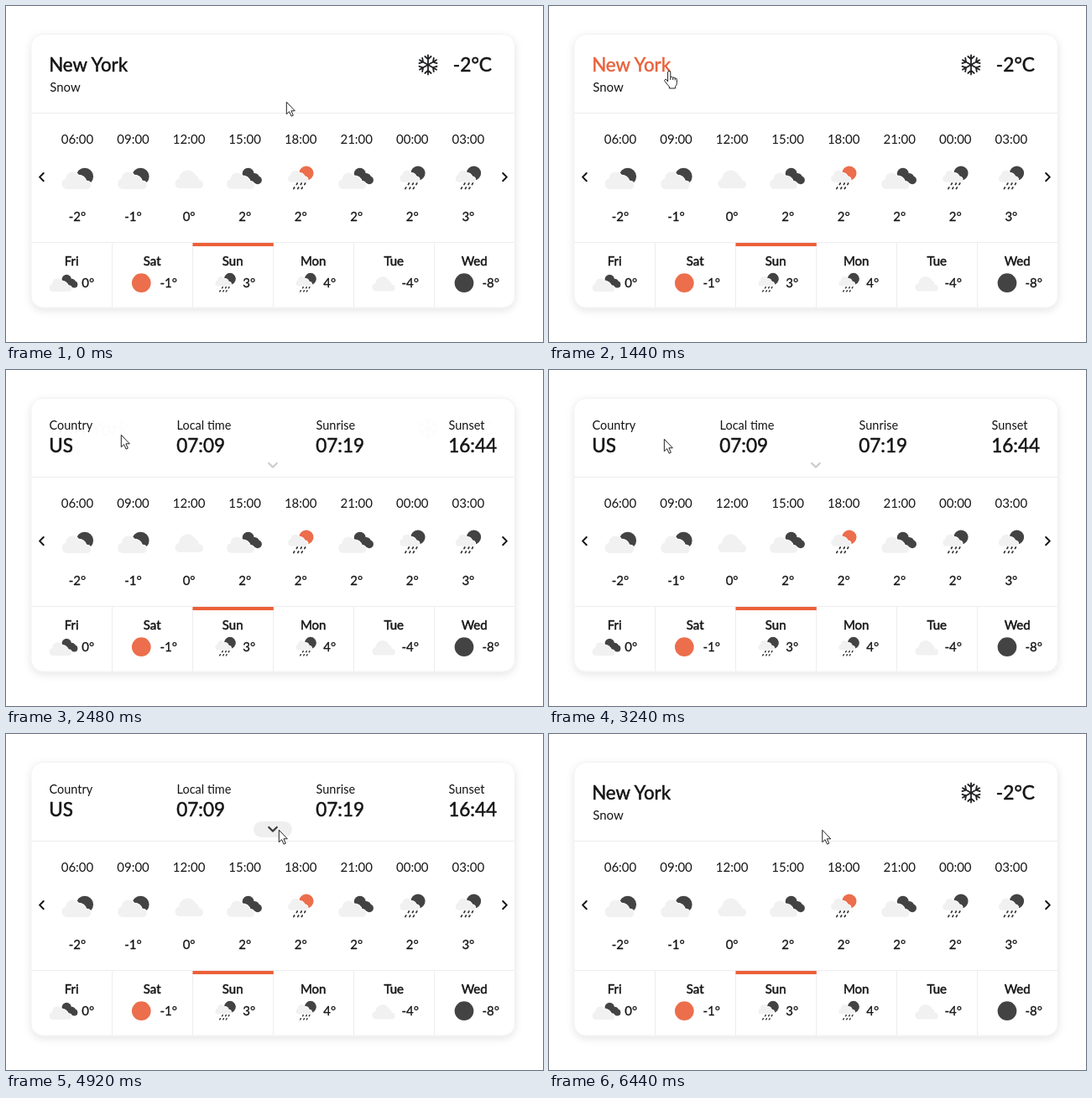
An HTML page that plays this animation: 640 px wide and 400 px high, repeating every 6480 ms.

```html
<!DOCTYPE html>
<html lang="en">
<head>
<meta charset="utf-8">
<title>Weather widget</title>
<style>
  html, body { margin: 0; width: 100%; height: 100%; overflow: hidden; background: #fff; }
  svg { display: block; width: 640px; height: 400px; }
  text { font: 15px Lato, "Open Sans", sans-serif; fill: currentColor; color: #151515; }
  .mid { text-anchor: middle; }
  .medium { stroke: currentColor; stroke-width: .3; stroke-linejoin: round; }
  .bold { stroke: currentColor; stroke-width: .5; stroke-linejoin: round; }
  .label { font-size: 14.5px; }
  .value { font-size: 22.5px; }
  .title { font-size: 22.3px; color: inherit; }
  .temp { font-size: 22.7px; }
  .stroke { fill: none; stroke-linecap: round; stroke-linejoin: round; }
</style>
</head>
<body>
<svg id="stage" viewBox="0 0 640 400"></svg>
<script>
const LOOP = 6480;
const DARK = '#434343', ORANGE = '#ec6e4c', LIGHT = '#f1f1f1', LINE = '#ededf0';
const SHIFT = 25.5;

const text = (x, y, content, cls = '') => `<text x="${x}" y="${y}" class="${cls}">${content}</text>`;
const circle = (x, y, r, fill) => `<circle cx="${x}" cy="${y}" r="${r}" fill="${fill}"/>`;
const line = (x1, y1, x2, y2) => `<path d="M${x1} ${y1}L${x2} ${y2}" stroke="${LINE}"/>`;
const place = (x, y, scale, content) =>
  `<g transform="translate(${x} ${y}) scale(${scale})">${content}</g>`;

const CLOUD = 'M-12 11A6 6 0 0 1-13-.9A11 11 0 0 1 8-5A7 7 0 0 1 12 1A5 5 0 0 1 12.5 11Z';
const FRONT = 'M-13 13A6.2 6.2 0 0 1-13.5.8A7.6 7.6 0 0 1 1-3A9 9 0 0 1 10.5 4A4.6 4.6 0 0 1 12.5 13Z';
const frontCloud = (x, y, scale) => place(x, y, scale,
  `<path d="${FRONT}" fill="#fff" stroke="#fff" stroke-width="2.4"/><path d="${FRONT}" fill="${LIGHT}"/>`);

const drops = [[-4, 6], [1, 6], [5.5, 6], [-7.5, 11], [-2.5, 11], [2, 11]]
  .map(([x, y]) => `M${x} ${y}l-.9 1.6`).join('');
const rain = sun => circle(6.7, -6, 8.6, sun) + frontCloud(-2.5, -4.2, .68) +
  `<path class="stroke" d="${drops}" stroke="#333" stroke-width="1.7"/>`;

const icons = {
  moonCloud: circle(8.8, -2, 10.3, DARK) + frontCloud(0, 0, 1),
  cloud: place(.5, 1.5, .96, `<path d="${CLOUD}" fill="${LIGHT}"/>`),
  clouds: circle(4, -5.3, 7, DARK) + circle(11.5, 0, 6, DARK) + circle(15.3, 2.3, 4.9, DARK) +
    frontCloud(-4, .5, .95),
  rain: rain(DARK),
  sunRain: rain(ORANGE),
  sun: circle(0, 0, 14, ORANGE),
  moon: circle(0, 0, 14, DARK)
};

const hours = [
  ['06:00', 'moonCloud', '-2°'], ['09:00', 'moonCloud', '-1°'], ['12:00', 'cloud', '0°'],
  ['15:00', 'clouds', '2°'], ['18:00', 'sunRain', '2°'], ['21:00', 'clouds', '2°'],
  ['00:00', 'rain', '2°'], ['03:00', 'rain', '3°']
].map(([hour, icon, degrees], i) => {
  const x = 85 + i * 66.55;
  return text(x, 163.5, hour, 'mid') + place(x, 205, 1, icons[icon]) +
    text(x, 256, degrees, 'mid medium');
}).join('');

const days = [
  ['Fri', 'clouds', '0°', 38.5], ['Sat', 'sun', '-1°', 34.8], ['Sun', 'rain', '3°', 39],
  ['Mon', 'rain', '4°', 39], ['Tue', 'cloud', '-4°', 35.5], ['Wed', 'moon', '-8°', 35.5]
].map(([day, icon, degrees, iconX], i) => {
  const left = 30.5 + i * 96;
  return (i ? line(left, 282, left, 359) : '') +
    text(left + 47.7, 308.5, day, 'mid bold') +
    place(left + iconX, 329.7, .81, icons[icon]) +
    text(left + 67.3, 334.5, degrees, 'mid medium');
}).join('');

const arm = '<path d="M0 0V-11.6M-3.7-10L0-6.8L3.7-10"/>';
const snowflake = '<g class="stroke" stroke="#202124" stroke-width="1.8" transform="translate(503 70)">' +
  [0, 60, 120, 180, 240, 300].map(a => `<g transform="rotate(${a})">${arm}</g>`).join('') + '</g>';

const details = [
  [52, 'Country', 'US'], [204, 'Local time', '07:09'],
  [370, 'Sunrise', '07:19'], [528, 'Sunset', '16:44']
].map(([x, label, value]) =>
  text(x - .5, 71, label, 'label') + text(x - .8, 98, value, 'value bold')).join('');

document.getElementById('stage').innerHTML = `
  <defs><filter id="shadow" x="-10%" y="-10%" width="120%" height="125%">
    <feDropShadow dx="0" dy="3" stdDeviation="5" flood-color="#000" flood-opacity=".1"/>
  </filter></defs>
  <rect x="30" y="33.5" width="576.5" height="325.5" rx="14" fill="#fff" stroke="#f1f1f1" filter="url(#shadow)"/>
  ${line(30, 127.5, 606, 127.5)}${line(30, 281.5, 606, 281.5)}
  ${hours}${days}
  <rect x="222.5" y="282" width="96.3" height="4" fill="#ec5f38"/>
  <path class="stroke" d="M44.7 199l-4.6 4.6 4.6 4.6M592.2 199l4.6 4.6-4.6 4.6" stroke="#151515" stroke-width="2"/>
  <g id="summary">
    <g id="city">${text(51.2, 78.3, 'New York', 'title bold')}</g>
    ${text(52.2, 102.3, 'Snow')}
    ${snowflake}
    ${text(532.8, 77.5, '-2°C', 'temp bold')}
  </g>
  <g id="details">${details}</g>
  <g id="toggle">
    <rect id="pill" x="295" y="104" width="46" height="19" rx="9.5" fill="#efefef"/>
    <path id="chevron" class="stroke" d="M313.2 111l4.8 4.6 4.8-4.6" stroke-width="2.2"/>
  </g>
  <g id="cursor" fill="#fff" stroke="#222" stroke-width="1" stroke-linejoin="round">
    <path id="arrow" d="M.3.3V14.8L3.6 11.7L6.1 17.2L8.3 16.2L5.9 10.8H10.3Z"/>
    <path id="hand" d="M4.6 13V2Q4.6.4 6.2.4T7.8 2V7.6Q9.6 6.5 10.7 8.2Q12.4 7.3 13.2 9Q15.4 8.5 15.4 10.8V14.5Q15.4 17 13.7 18.6V21H6.4V19Q3.8 16.5 1 12.4Q.2 10.9 1.6 10.3T4.6 13M7.8 7.6V11M10.7 8.2V11M13.2 9V11.4"/>
  </g>`;

const [summary, city, detailsBox, toggle, pill, chevron, cursor, arrow, hand] =
  ['summary', 'city', 'details', 'toggle', 'pill', 'chevron', 'cursor', 'arrow', 'hand']
    .map(id => document.getElementById(id));

const clamp = v => Math.min(1, Math.max(0, v));
const ramp = (t, start, length) => clamp((t - start) / length);
const mix = (a, b, p) => a + (b - a) * p;
const mixColor = (a, b, p) => `rgb(${a.map((v, i) => Math.round(mix(v, b[i], p)))})`;

// The CSS "ease" curve, solved by bisection.
function ease(x) {
  if (x <= 0 || x >= 1) return clamp(x);
  const bezier = (s, a, b) => 3 * s * (1 - s) * (1 - s) * a + 3 * s * s * (1 - s) * b + s ** 3;
  let low = 0, high = 1;
  for (let i = 0; i < 20; i++) {
    const s = (low + high) / 2;
    if (bezier(s, .25, .25) < x) low = s; else high = s;
  }
  return bezier(low, .1, 1);
}

const route = [
  [0, 334, 114], [40, 334, 114], [360, 262, 98], [680, 176, 81], [900, 147, 77], [1300, 137, 77],
  [3200, 137, 77], [3240, 137, 82], [3720, 161, 90], [4400, 262, 111], [4880, 325, 114], [LOOP, 325.5, 114]
];

function pointer(t) {
  const i = route.findIndex(stop => stop[0] > t);
  const [t0, x0, y0] = route[i - 1], [t1, x1, y1] = route[i];
  const p = (t - t0) / (t1 - t0);
  return [mix(x0, x1, p), mix(y0, y1, p)];
}

function draw(t) {
  const closing = t > 5000;
  const open = closing ? 1 - ease(ramp(t, 5372, 500)) : ease(ramp(t, 2060, 500));
  // The incoming layer gains opacity ahead of the outgoing one.
  const lead = p => 1 - (1 - p) ** 2;
  summary.setAttribute('opacity', closing ? lead(1 - open) : 1 - open);
  detailsBox.setAttribute('opacity', closing ? open : lead(open));
  detailsBox.setAttribute('transform', `translate(0 ${SHIFT * (1 - open)})`);
  toggle.setAttribute('opacity', open);

  const hover = ease(ramp(t, 880, 250)) * (1 - ramp(t, 2070, 150));
  city.style.color = mixColor([21, 21, 21], [233, 98, 60], hover);

  const pillHover = ease(ramp(t, 4660, 200));
  pill.setAttribute('opacity', pillHover);
  chevron.setAttribute('stroke', mixColor([204, 204, 204], [60, 60, 60], pillHover));

  const pointing = t >= 880 && t < 2080;
  arrow.setAttribute('visibility', pointing ? 'hidden' : 'visible');
  hand.setAttribute('visibility', pointing ? 'visible' : 'hidden');
  cursor.setAttribute('transform', `translate(${pointer(t)})`);
}

const start = performance.now();
function tick() {
  draw((performance.now() - start) % LOOP);
  requestAnimationFrame(tick);
}
tick();
</script>
</body>
</html>
```
